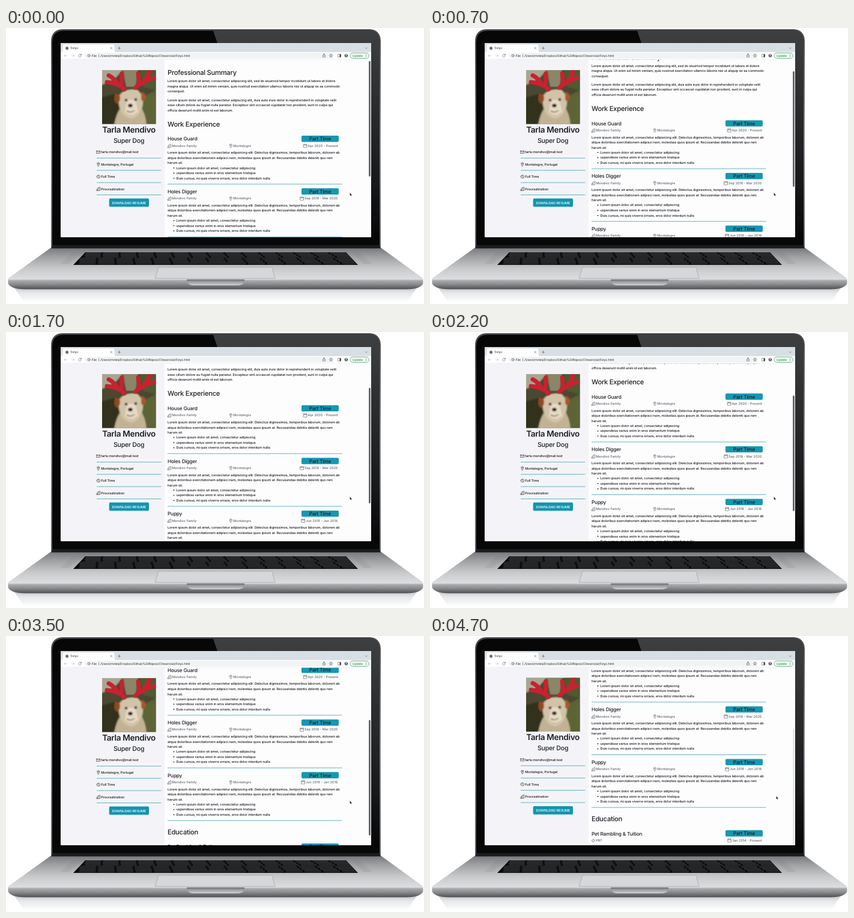
These frames come from a looping animation (696 by 459 pixels, 4.8 s). An HTML page:

```html
<!DOCTYPE html>
<html lang="en">
<head>
<meta charset="utf-8">
<title>Folyo</title>
<style>
  html, body { margin: 0; width: 100%; height: 100%; overflow: hidden; background: #fff; }
  svg { display: block; width: 696px; height: 459px; }
  text { font: 500 5.5px Inter, "Liberation Sans", sans-serif; letter-spacing: -.01em; fill: #16181b; text-rendering: geometricPrecision; white-space: pre; }
  .h1, .h2, .h3, .role, .badge { letter-spacing: -.024em; fill: #1d2024; }
  .h1 { font-size: 13.6px; font-weight: 600; }
  .h2 { font-size: 11.2px; }
  .role { font-size: 10.6px; }
  .h3, .badge { font-size: 8.3px; }
  .sub { fill: #62686f; letter-spacing: 0; }
  .ui { font-size: 4.95px; font-weight: 400; letter-spacing: 0; fill: #202124; }
  .btn { fill: #fff; letter-spacing: 0; }
  .mid { text-anchor: middle; }
  .line { fill: none; stroke: #55595e; stroke-width: .6; stroke-linecap: round; stroke-linejoin: round; }
  .dark { stroke: #222; }
  .rule { stroke: #459fb0; stroke-width: .8; }
</style>
</head>
<body>
<svg viewBox="0 0 696 459" xmlns="http://www.w3.org/2000/svg">
  <defs>
    <linearGradient id="rim" x2="0" y2="1"><stop stop-color="#4a4b4d"/><stop offset=".5" stop-color="#85878a"/><stop offset="1" stop-color="#606265"/></linearGradient>
    <linearGradient id="gloss" x2="0" y2="1"><stop stop-color="#3d3f41"/><stop offset=".75" stop-color="#17181a"/><stop offset="1" stop-color="#070708"/></linearGradient>
    <linearGradient id="deck" x2="0" y2="1"><stop stop-color="#77797c"/><stop offset=".3" stop-color="#a2a4a6"/><stop offset=".65" stop-color="#c9cacc"/><stop offset="1" stop-color="#dedfe0"/></linearGradient>
    <linearGradient id="lip" x2="0" y2="1"><stop stop-color="#dcddde"/><stop offset=".15" stop-color="#a9abad"/><stop offset=".55" stop-color="#85878a"/><stop offset="1" stop-color="#4e5053"/></linearGradient>
    <linearGradient id="notch" x2="0" y2="1"><stop stop-color="#6f7174"/><stop offset=".5" stop-color="#a3a5a8"/><stop offset="1" stop-color="#cfd0d2"/></linearGradient>
    <linearGradient id="shade" x2="0" y2="1"><stop stop-color="#c6c8ca"/><stop offset=".35" stop-color="#e6e7e8"/><stop offset="1" stop-color="#fff"/></linearGradient>
    <clipPath id="view"><rect x="91" y="52.5" width="517" height="295.5"/></clipPath>
    <clipPath id="frame"><rect x="160" y="70" width="89.5" height="89.5"/></clipPath>
    <filter id="soft"><feGaussianBlur stdDeviation=".8"/></filter>
  </defs>

  <!-- laptop -->
  <path d="M14 432H684L668 456H30Z" fill="url(#shade)"/>
  <path d="M75 367V23Q75 2 95 2H604Q624 2 624 23V367Z" fill="url(#rim)"/>
  <path d="M77 367V24Q77 4.5 96 4.5H603Q622 4.5 622 24V367Z" fill="#070708"/>
  <path d="M345 4.5H603Q622 4.5 622 24V348H608V25H352Z" fill="url(#gloss)"/>
  <path d="M74 366H625L694 416V419H4V416Z" fill="url(#deck)"/>
  <path d="M78 361H621L624 366.500H75Z" fill="#1b1c1e"/>
  <g id="keys"></g>
  <path d="M254 398H443L448 416.5H248Z" fill="#d6d7d8" stroke="#9fa1a4" stroke-width=".7"/>
  <path d="M3.500 417.500H694.500V425Q690 434 668 434.500H30Q8 434 3.500 425Z" fill="url(#lip)"/>
  <path d="M301 418H397V421Q395 428 386 428H312Q303 428 301 421Z" fill="url(#notch)"/>

  <!-- page -->
  <rect x="91" y="25" width="517" height="323" fill="#fdfdfe"/>
  <rect x="91" y="52" width="173" height="296" fill="#f4f4f8"/>
  <g clip-path="url(#view)">
    <g id="main"></g>
    <g id="side">
      <g clip-path="url(#frame)">
        <rect x="160" y="70" width="90" height="90" fill="#4b4730"/>
        <g filter="url(#soft)">
          <path d="M158 68H196L182 84L158 96Z" fill="#a9a593"/>
          <path d="M194 68H220L216 98H200Z" fill="#8b8667"/>
          <path d="M222 68H252V104L228 98Z" fill="#4f5a32"/>
          <path d="M158 116L188 108V162H158Z" fill="#33301f"/>
          <path d="M226 116L252 102V162H224Z" fill="#5b6436"/>
          <path d="M180 162Q184 138 194 130H224Q233 144 234 162Z" fill="#c2b294"/>
          <path d="M190 110Q200 99 219 103Q231 113 227 131Q222 148 209 151Q194 149 189 132Q185 118 190 110Z" fill="#d2c3a8"/>
          <path d="M201 122Q208 116 216 122L220 139Q209 149 198 140Z" fill="#e6dac5"/>
          <path d="M182 109Q190 108 190 117Q189 125 184 126Q178 120 182 109Z" fill="#93491f"/>
          <path d="M225 106Q233 108 233 116Q230 123 225 120Z" fill="#a8592a"/>
          <circle cx="200" cy="120" r="2.300" fill="#3a2c22"/>
          <circle cx="216" cy="119" r="2.300" fill="#3a2c22"/>
          <ellipse cx="207" cy="129" rx="3.800" ry="3" fill="#33251f"/>
          <path d="M201 138Q208 142 214 137" fill="none" stroke="#7b6152" stroke-width="1.500"/>
        </g>
        <g fill="none" stroke="#cb2030" stroke-width="7" stroke-linecap="round" stroke-linejoin="round">
          <path d="M197 102Q190 93 168 90M184 90Q178 82 171 79M192 94L193 76"/>
          <path d="M216 99Q222 92 245 83M222 92L220 76M231 88Q236 80 239 71"/>
        </g>
      </g>
    </g>
    <rect id="thumb" x="604.2" y="55" width="2.6" height="192" rx="1.3" fill="#55575a"/>
  </g>

  <!-- browser bar -->
  <rect x="91" y="25" width="517" height="15" fill="#d8dfe4"/>
  <path d="M92 40Q94.500 40 94.500 37V30Q94.500 27.500 97 27.500H178Q180.500 27.500 180.500 30V37Q180.500 40 183 40Z" fill="#fff"/>
  <rect x="91" y="40" width="517" height="12.300" fill="#fff"/>
  <path d="M91 52.300H608" stroke="#dcdee1" stroke-width=".5"/>
  <rect x="131.500" y="41.300" width="415" height="9.400" rx="4.700" fill="#f1f3f4"/>
  <circle cx="101.500" cy="33.500" r="2.500" fill="#4d5156"/>
  <path d="M99.600 32.400L101.300 33.400L100.600 35M102 31.700L103.200 33.300" stroke="#e8eaec" stroke-width=".6" fill="none"/>
  <g class="line">
    <path d="M173.700 32L176.700 35M176.700 32L173.700 35M188.500 31.300V35.700M186.300 33.500H190.700M598.300 32.700L600 34.500L601.700 32.700"/>
    <path d="M101.500 46H97M99 44L97 46L99 48M109 46H113.500M111.500 44L113.500 46L111.500 48" stroke="#b0b3b7"/>
    <path d="M125 44.700A2.300 2.300 0 1 0 125.300 46.700M125.300 43.200V45H123.500"/>
    <circle cx="138" cy="46" r="2.100"/>
    <path d="M138 46V47.100M138 44.900V45M154.500 43.700V48.300"/>
    <path d="M528.200 45H527.300V48.300H531.700V45H530.800M529.500 47V43M528.300 44L529.500 42.900L530.700 44"/>
    <path d="M541 43.200L541.800 45.100L543.700 45.200L542.200 46.500L542.700 48.500L541 47.400L539.300 48.500L539.800 46.500L538.300 45.200L540.200 45.100Z"/>
    <rect x="553" y="43.700" width="4.600" height="4.600"/>
  </g>
  <rect x="555.500" y="43.700" width="2.300" height="4.600" fill="#3f4246"/>
  <circle cx="566.500" cy="46" r="2.800" fill="#50555b"/>
  <circle cx="566.500" cy="45" r="1" fill="#fff"/>
  <path d="M564.900 47.600Q566.500 45.700 568.100 47.600" fill="#fff"/>
  <rect x="573" y="41.400" width="31.500" height="9.200" rx="4.600" fill="#eef7f0" stroke="#46986a" stroke-width=".7"/>
  <g fill="#188048"><circle cx="599.500" cy="44.300" r=".5"/><circle cx="599.500" cy="46" r=".5"/><circle cx="599.500" cy="47.700" r=".5"/></g>
  <g id="bar"></g>
  <path id="arrow" d="M0 0V5.200L1.200 4.100L2 6L2.900 5.600L2.100 3.800H3.700Z" fill="#000" stroke="#fff" stroke-width=".4"/>
</svg>
<script>
const $ = id => document.getElementById(id);

function add(parent, tag, attrs, label) {
  const el = document.createElementNS('http://www.w3.org/2000/svg', tag);
  for (const k in attrs) el.setAttribute(k, attrs[k]);
  if (label) el.textContent = label;
  return parent.appendChild(el);
}

// y is the middle of the capitals
const SIZE = { h1: 13.6, h2: 11.2, role: 10.6, h3: 8.3, badge: 8.3, ui: 4.95 };
function text(g, x, y, label, cls = '') {
  const size = SIZE[cls.split(' ')[0]] || 5.5;
  return add(g, 'text', { x, y: y + size * .364, class: cls }, label);
}
const rule = (g, x1, x2, y) => add(g, 'path', { d: `M${x1} ${y}H${x2}`, class: 'rule' });

const ICONS = {
  mail: 'M-2.8-2H2.8V2H-2.8ZM-2.8-1.8L0 .4L2.8-1.8',
  pin: 'M0 3Q-2.1.3-2.1-1A2.1 2.1 0 0 1 2.1-1Q2.1.3 0 3ZM-.7-1A.7.7 0 1 0 .7-1A.7.7 0 1 0-.7-1',
  clock: 'M-2.7 0A2.7 2.7 0 1 0 2.7 0A2.7 2.7 0 1 0-2.7 0M0-1.6V.2L1.2.8',
  bars: 'M-2.8 2.8V.8L-.8-.2V2.8M-.8-.2V-1.7L2.7-2.9V2.8H-2.8M1-.7V-.6M1 .9V1',
  date: 'M-2.7-2.3H2.7V2.7H-2.7ZM-2.7-1H2.7M-1.4-3V-2.3M1.4-3V-2.3',
  sign: 'M-2.8 0L0-1.7L2.8 0L0 1.7ZM0-2.9V-1.7M0 1.7V2.9'
};
const icon = (g, name, x, y, cls = '') =>
  add(g, 'path', { d: ICONS[name], transform: `translate(${x} ${y})`, class: 'line ' + cls });

function keyboard() {
  const g = $('keys'), rows = 6, cols = 15;
  const y = v => 373.5 + 19.5 * Math.pow(v, 1.15);
  const x = (u, v) => 132 - 19 * v + u * (434 + 38 * v);
  add(g, 'path', { d: 'M132 373H566L586 394H112Z', fill: '#0c0c0d' });
  const quad = (a, b, r) => {
    const t = (r + .12) / rows, k = (r + .85) / rows;
    add(g, 'path', {
      d: `M${x(a, t)} ${y(t)}L${x(b, t)} ${y(t)}L${x(b, k)} ${y(k)}L${x(a, k)} ${y(k)}Z`,
      fill: '#1c1d1f', stroke: '#5f6164', 'stroke-width': .35
    });
  };
  for (let r = 0; r < rows; r++)
    for (let c = 0; c < cols; c++) {
      const shift = (r % 3) * .006;
      if (r === 5 && c > 4 && c < 9) continue;
      quad((c + .08) / cols + shift, Math.min((c + .92) / cols + shift, .995), r);
    }
  quad(5.08 / cols + .012, 8.92 / cols + .012, 5);
  for (const side of [-1, 1])
    for (let r = 0; r < 9; r++)
      add(g, 'path', {
        d: `M${350 + side * (226 + r * 2.3)} ${374 + r * 2.2}h${side * 14}`,
        stroke: '#77797c', 'stroke-width': .7, 'stroke-dasharray': '.7 .8'
      });
}

function badge(g, y) {
  add(g, 'rect', { x: 492, y: y - 5.2, width: 62, height: 10.4, rx: 1.8, fill: '#1697b2' });
  text(g, 523, y, 'Part Time', 'badge mid');
}

function entry(g, y, title, org, orgIcon, dates, dateX) {
  text(g, 269, y, title, 'h3');
  badge(g, y - .2);
  icon(g, orgIcon, 272, y + 11.6);
  text(g, 276.2, y + 11.3, org, 'sub');
  icon(g, 'date', dateX - 4.2, y + 11.6);
  text(g, dateX, y + 11.3, dates, 'sub');
}

function job(g, y, title, dates, dateX) {
  entry(g, y, title, 'Mendivo Family', 'bars', dates, dateX);
  icon(g, 'pin', 374.3, y + 11.6);
  text(g, 378.3, y + 11.3, 'Montalegre', 'sub');
  [
    'Lorem ipsum dolor sit amet, consectetur adipisicing elit. Delectus dignissimos, temporibus laborum, dolorem ab',
    'atque doloribus exercitationem adipisci nam, molestias quos ipsum at. Recusandae debitis deleniti quo rem',
    'harum sit.'
  ].forEach((s, i) => text(g, 269, y + 22.9 + i * 8.55, s));
  [
    'Lorem ipsum dolor sit amet, consectetur adipiscing',
    'uspendisse varius enim in eros elementum tristique',
    'Duis cursus, mi quis viverra ornare, eros dolor interdum nulla'
  ].forEach((s, i) => {
    const cy = y + 48.1 + i * 8.55;
    add(g, 'circle', { cx: 279.5, cy: cy + .2, r: .9, fill: '#16181b' });
    text(g, 283.5, cy, s);
  });
  rule(g, 269, 559.5, y + 75.2);
}

function build() {
  const m = $('main'), s = $('side'), b = $('bar');
  text(m, 269, 74.2, 'Professional Summary', 'h2');
  [
    [88.3, 'Lorem ipsum dolor sit amet, consectetur adipiscing elit, sed do eiusmod tempor incididunt ut labore et dolore'],
    [96.8, 'magna aliqua. Ut enim ad minim veniam, quis nostrud exercitation ullamco laboris nisi ut aliquip ex ea commodo'],
    [105.3, 'consequat.'],
    [119.5, 'Lorem ipsum dolor sit amet, consectetur adipiscing elit, duis aute irure dolor in reprehenderit in voluptate velit'],
    [128, 'esse cillum dolore eu fugiat nulla pariatur. Excepteur sint occaecat cupidatat non proident, sunt in culpa qui'],
    [136.5, 'officia deserunt mollit anim id est laborum.']
  ].forEach(([y, l]) => text(m, 269, y, l));
  text(m, 269, 159.7, 'Work Experience', 'h2');
  job(m, 184.4, 'House Guard', 'Apr 2020 - Present', 502.5);
  job(m, 272, 'Holes Digger', 'Sep 2018 - Mar 2020', 497);
  job(m, 359.6, 'Puppy', 'Jun 2016 - Jan 2018', 499);
  text(m, 269, 453.7, 'Education', 'h2');
  entry(m, 478.2, 'Pet Rambling & Tuition', 'PRT', 'sign', 'Jan 2014 - Present', 503);

  text(s, 204.6, 168.8, 'Tarla Mendivo', 'h1 mid');
  text(s, 204.6, 187, 'Super Dog', 'role mid');
  [
    ['mail', 'tarla.mendivo@mail.test'], ['pin', 'Montalegre, Portugal'],
    ['clock', 'Full Time'], ['bars', 'Procrastination']
  ].forEach(([name, label], i) => {
    const y = 206.4 + i * 20.4;
    icon(s, name, 153.8, y, 'dark');
    text(s, 158.2, y, label);
    rule(s, 151, 258.5, y + 9.9);
  });
  add(s, 'rect', { x: 171.7, y: 283.6, width: 66.4, height: 13.6, rx: 1.8, fill: '#1295b0' });
  text(s, 204.9, 290.5, 'DOWNLOAD RESUME', 'btn mid');

  text(b, 107.5, 33.5, 'Folyo', 'ui');
  text(b, 142.8, 46, 'File', 'ui');
  text(b, 157, 46, '/Users/mirela/Dropbox/Github%20Repos/CVexercise/Folyo.html', 'ui');
  text(b, 577, 46, 'Update', 'ui').style.fill = '#188048';
}

// [ms, value] steps, straight between them
const SCROLL = [[0, 0], [300, 12.7], [400, 12.7], [700, 25.6], [1300, 43.4], [1600, 57.3],
  [1800, 57.3], [2200, 76.7], [2900, 102.4], [4000, 149.1], [4200, 149.7]];
const SIDE = [[4000, 0], [4200, -.5]];
const MOVE = [[4200, 0], [4700, 1]];
const FADE = [[4400, 1], [4700, .15]];

function at(steps, t) {
  if (t <= steps[0][0]) return steps[0][1];
  for (let i = 1; i < steps.length; i++) {
    const [t0, v0] = steps[i - 1], [t1, v1] = steps[i];
    if (t <= t1) return v0 + (v1 - v0) * (t - t0) / (t1 - t0);
  }
  return steps[steps.length - 1][1];
}

const LOOP = 4800, TICK = 100;
const start = performance.now();
function draw() {
  const now = Math.max(0, performance.now() - start) % LOOP;
  const t = Math.floor(now / TICK) * TICK;
  const y = at(SCROLL, t), k = at(MOVE, t);
  const shift = (id, dx, dy) => $(id).setAttribute('transform', `translate(${dx} ${dy})`);
  shift('main', 0, -y);
  shift('side', 0, at(SIDE, t));
  shift('thumb', 0, y * .663);
  shift('arrow', 572.5 + 4 * k, 274 - 7.7 * k);
  $('thumb').setAttribute('opacity', at(FADE, t));
  requestAnimationFrame(draw);
}

keyboard();
build();
draw();
</script>
</body>
</html>
```
